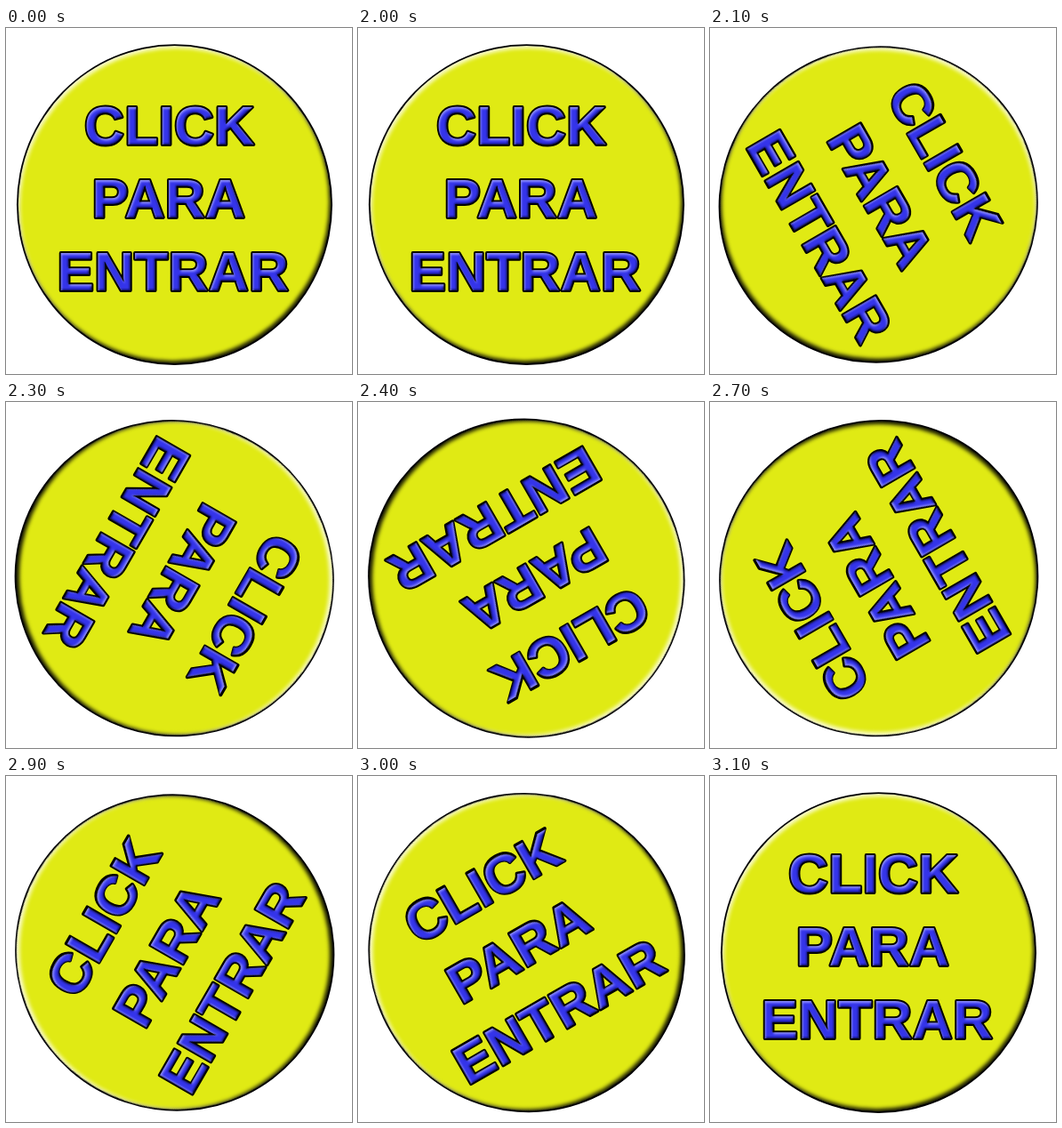
Recreate the animation shown at these times as an HTML page. Size 389 by 389 pixels, loop 3.2 s.

```html
<!DOCTYPE html>
<html lang="es">
<head>
<meta charset="utf-8">
<style>
  html, body { margin: 0; width: 100%; height: 100%; overflow: hidden; background: #fff; }
  svg { display: block; width: 389px; height: 389px; }
  text { font: bold 62px "Liberation Sans", Arial, sans-serif; letter-spacing: .4px; }
</style>
</head>
<body>
<svg viewBox="0 0 389 389">
  <defs>
    <!-- Inner bevels: pale edge at the top left, dark edge at the bottom right -->
    <filter id="discBevel" color-interpolation-filters="sRGB">
      <feGaussianBlur in="SourceAlpha" stdDeviation="2" result="soft"/>
      <feOffset in="soft" dx="1.8" dy="2.6" result="low"/>
      <feOffset in="soft" dx="-1.6" dy="-2.6" result="high"/>
      <feFlood flood-color="#fffff0" flood-opacity=".85"/>
      <feComposite operator="out" in2="low" result="light"/>
      <feFlood flood-color="#000" flood-opacity=".9"/>
      <feComposite operator="out" in2="high" result="dark"/>
      <feMerge result="edges">
        <feMergeNode in="SourceGraphic"/><feMergeNode in="light"/><feMergeNode in="dark"/>
      </feMerge>
      <feComposite in="edges" in2="SourceAlpha" operator="in"/>
    </filter>
    <filter id="textBevel" color-interpolation-filters="sRGB">
      <feGaussianBlur in="SourceAlpha" stdDeviation="1.2" result="soft"/>
      <feOffset in="soft" dx="1.2" dy="1.8" result="low"/>
      <feOffset in="soft" dx="-.7" dy="-1.1" result="high"/>
      <feFlood flood-color="#9a9aff" flood-opacity=".85"/>
      <feComposite operator="out" in2="low" result="light"/>
      <feFlood flood-color="#000030" flood-opacity=".85"/>
      <feComposite operator="out" in2="high" result="dark"/>
      <feMerge result="edges">
        <feMergeNode in="SourceGraphic"/><feMergeNode in="dark"/><feMergeNode in="light"/>
      </feMerge>
      <feComposite in="edges" in2="SourceAlpha" operator="in"/>
    </filter>
    <g id="words">
      <text x="88" y="130.5">CLICK</text>
      <text x="96.5" y="213">PARA</text>
      <text x="57.4" y="295.3">ENTRAR</text>
    </g>
  </defs>
  <g id="button">
    <ellipse cx="189.5" cy="198.6" rx="177.5" ry="180.3"/>
    <ellipse cx="189.5" cy="198.6" rx="175.8" ry="178.6" fill="#e0ea14" filter="url(#discBevel)"/>
    <use href="#words" stroke="#000" stroke-width="3.8" stroke-linejoin="round"/>
    <use href="#words" fill="#3434ea" filter="url(#textBevel)"/>
  </g>
</svg>
<script>
  const LOOP = 3200, SPIN_START = 2100, STEP = 100;
  const button = document.getElementById("button");

  // Rests upright, jumps to 60 degrees, then turns 30 degrees per step
  function angleAt(t) {
    return t < SPIN_START ? 0 : 60 + 30 * Math.floor((t - SPIN_START) / STEP);
  }

  function draw(now) {
    button.setAttribute("transform", `rotate(${angleAt(now % LOOP)} 189.5 198.3)`);
    requestAnimationFrame(draw);
  }
  draw(performance.now());
</script>
</body>
</html>
```
